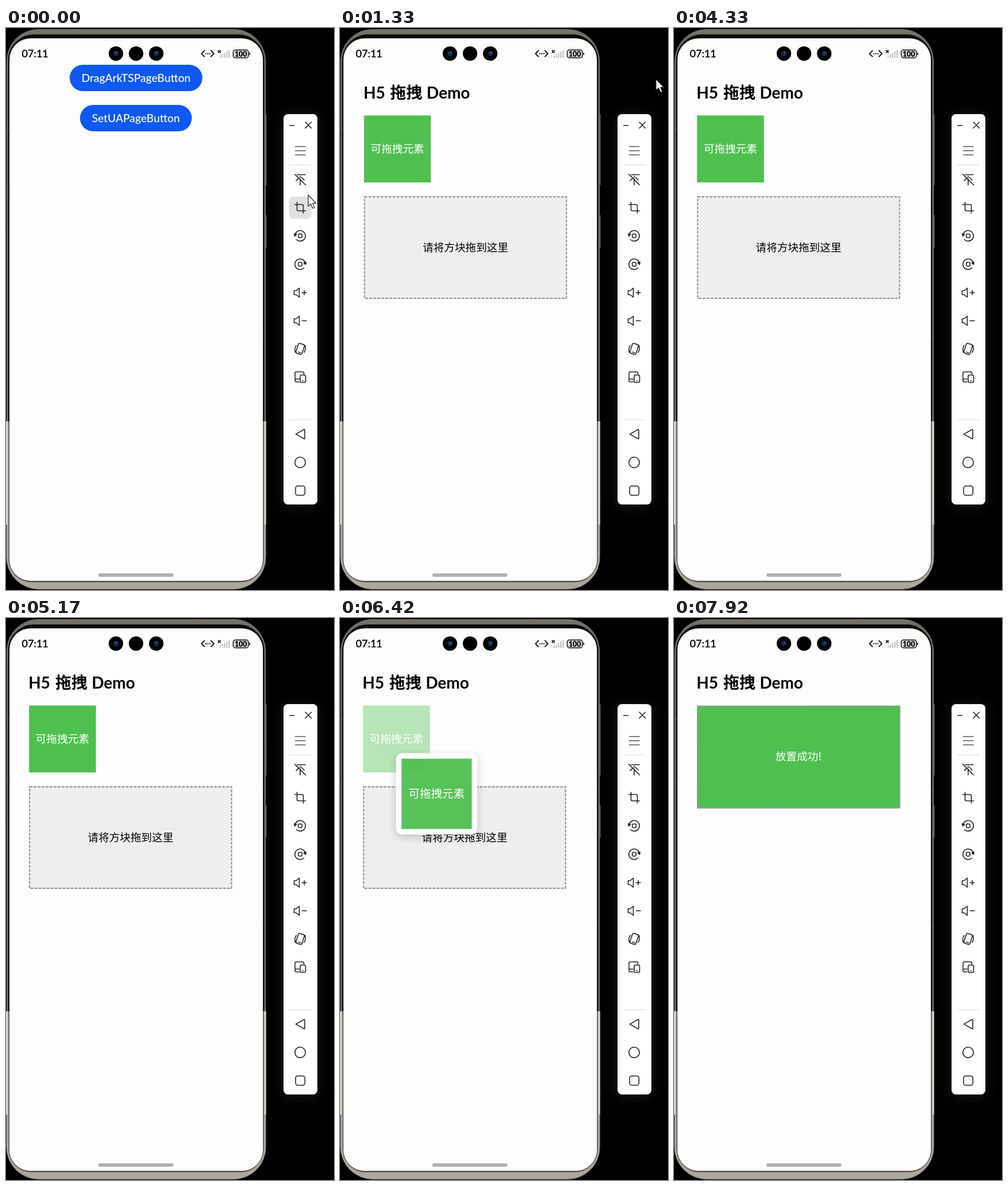
Animation of 572x979 px, one loop 8 s. Source, as an HTML page:

```html
<!DOCTYPE html>
<html lang="zh-CN">
<head>
<meta charset="utf-8">
<title>Drag demo</title>
<style>
  html, body { margin: 0; width: 100%; height: 100%; overflow: hidden; background: #000; }
  svg { display: block; width: 572px; height: 979px; }
  text { font-family: Lato, "Noto Sans CJK SC", "Noto Sans CJK", sans-serif; }
  .label { font-size: 19.3px; font-weight: 500; fill: #fff; text-anchor: middle; }
  .body { font-size: 18.67px; text-anchor: middle; font-family: "Noto Sans CJK SC", "Noto Sans CJK", sans-serif; }
  .title { font-size: 28px; font-weight: 700; }
  .icon { fill: none; stroke: #222; stroke-width: 1.6; stroke-linejoin: round; stroke-linecap: round; }
  #card { filter: drop-shadow(0 4px 7px rgba(0, 0, 0, .2)); }
  #bar { filter: drop-shadow(0 2px 12px rgba(255, 255, 255, .1)); }
</style>
</head>
<body>
<svg viewBox="0 0 572 979">
  <defs>
    <clipPath id="screen"><rect x="6" y="18" width="442" height="945" rx="37"/></clipPath>
    <clipPath id="lower"><rect y="685" width="456" height="294"/></clipPath>
    <linearGradient id="rim" x2="0" y2="1">
      <stop offset="0" stop-color="#77746d"/>
      <stop offset=".08" stop-color="#4d4b47"/>
      <stop offset="1" stop-color="#55534e"/>
    </linearGradient>
    <g id="tile">
      <rect x="-58.3" y="-58.3" width="116.6" height="116.6" fill="#4fc050"/>
      <text class="body" y="6.6" fill="#fff">可拖拽元素</text>
    </g>
  </defs>

  <!-- phone -->
  <rect x="1.5" y="2.5" width="451" height="974" rx="55" fill="url(#rim)" stroke="#77746d"/>
  <rect x="3" y="10.5" width="448" height="958" rx="46" fill="#0a0a0a" stroke="#716e68" stroke-width="1.4"/>
  <path d="M453.8 150V274M453.8 326V383" stroke="#55534e" stroke-width="1.6"/>
  <path d="M0 176H5M0 286H5M449 300H454M449 537H454M125 1V5M330 1V5" stroke="#66635c"/>
  <g clip-path="url(#lower)">
    <rect x="1" y="3" width="452" height="974.5" rx="56" fill="#aba79c" stroke="#8d897f"/>
    <path d="M1.5 685V865M452 685V865" stroke="#d5d1c5" stroke-width="3"/>
    <rect x="4.500" y="10" width="445" height="955.500" rx="40" fill="#55524c"/>
  </g>
  <rect x="6" y="18" width="442" height="945" rx="37" fill="#fdfdfd"/>

  <g clip-path="url(#screen)">
    <g id="menu">
      <rect x="111" y="64" width="231.5" height="46" rx="23" fill="#0f58f3"/>
      <text class="label" x="226.8" y="93.5">DragArkTSPageButton</text>
      <rect x="129" y="134" width="195" height="46" rx="23" fill="#0f58f3"/>
      <text class="label" x="226.5" y="163.5">SetUAPageButton</text>
    </g>
    <g id="page">
      <rect x="6" y="60" width="442" height="903" fill="#fdfdfd"/>
      <text class="title" x="39.3" y="122.5">H5</text>
      <text class="title" x="86" y="122.5">拖拽</text>
      <text class="title" x="149.5" y="122.5">Demo</text>
      <use id="source" href="#tile" x="98.5" y="210.7"/>
      <g id="zone">
        <rect id="zoneFill" x="40" y="293" width="354.5" height="179"/>
        <rect x="41.1" y="294.1" width="352.2" height="176.8" fill="none" stroke="#96949a" stroke-width="2.2" stroke-dasharray="4.67 2.33"/>
        <text id="zoneText" class="body" x="217.2" y="388.5"></text>
      </g>
    </g>
    <g id="card">
      <rect id="cardEdge" x="-67.6" y="-67.6" width="135.2" height="135.2" rx="11" fill="#fff"/>
      <use href="#tile"/>
    </g>
    <g id="badge">
      <circle r="14" fill="#0ee183"/>
      <path d="M-7 0H7M0 -7V7" stroke="#fff" stroke-width="1.6"/>
    </g>
  </g>

  <!-- status bar -->
  <text x="27.5" y="51" font-size="18" font-weight="500" stroke="#000" stroke-width=".3">07:11</text>
  <circle cx="191.7" cy="44.5" r="12.6"/><circle cx="226.8" cy="44.5" r="12.6"/><circle cx="262" cy="44.5" r="12.6"/>
  <g fill="#17295c"><circle cx="191.7" cy="44.5" r="4.5"/><circle cx="262" cy="44.5" r="4.5"/></g>
  <g fill="#5b7ac0"><circle cx="193" cy="43" r="1.1"/><circle cx="263.3" cy="43" r="1.1"/></g>
  <path d="M346.5 39L341 44.7L346.5 50.4M357 39L362.5 44.7L357 50.4" fill="none" stroke="#111" stroke-width="1.9"/>
  <path d="M347.5 44.7h2M351 44.7h2M354.5 44.7h2" stroke="#111" stroke-width="2"/>
  <path d="M369.6 38.6l4.8 4.8m0-4.8l-4.8 4.8" stroke="#111" stroke-width="1.7"/>
  <path d="M373.5 52v-4M377.4 52v-6M381.3 52v-8.5M385.2 52v-11M389.1 52v-13.5" stroke="#bbb" stroke-width="2"/>
  <rect x="396.2" y="38.2" width="26.6" height="13.8" rx="4" fill="#d8d8d8" stroke="#111" stroke-width="1.5"/>
  <path d="M425 43v4" stroke="#111" stroke-width="1.6"/>
  <text x="409.5" y="49.6" font-size="12.5" font-weight="900" text-anchor="middle">100</text>
  <rect x="161" y="950" width="131" height="6" rx="3" fill="#b0b0b0"/>

  <!-- toolbar -->
  <rect id="bar" x="484" y="150" width="59" height="680" rx="7.5" fill="#fff"/>
  <rect id="hover" x="493.5" y="293.5" width="39.5" height="39" rx="8" fill="#e1e1e1"/>
  <path d="M494 238.5H533M494 682.5H533" stroke="#dcdcdc"/>
  <g class="icon">
    <path d="M494.5 169.7H502.5M522 164L532.5 174.5M532.5 164L522 174.5"/>
    <path stroke="#555" d="M504.5 206.5H522M504.5 213.8H522M504.5 221H522"/>
    <g transform="translate(513 264)"><path d="M-9.5 -9.5L9.5 9.5M-5 -8.5H9M0 9.5V-1M-7 2L-2 -3M2 -4L7 1M0 -6V-4"/></g>
    <g transform="translate(513 313)"><path d="M-9.5 -5.5H3Q5.5 -5.5 5.5 -3V9.5M-5.5 -9.5V3Q-5.5 5.5 -3 5.5H9.5"/></g>
    <g id="turn" transform="translate(513 362)">
      <path d="M-8.7 -3A9.2 9.2 0 1 1 -6.5 6.5"/><rect x="-3.2" y="-3.2" width="6.4" height="6.4" rx="1.5"/>
      <path d="M-10.3 -3.5L-6.2 -2.5L-9.3 .5Z" fill="#222"/>
    </g>
    <use href="#turn" transform="translate(1026 49.5) scale(-1 1)"/>
    <g id="speaker" transform="translate(513 461)"><path d="M-10.5 -3.5H-7L-1.5 -8V8L-7 3.5H-10.5Z"/><path d="M3.5 0H11"/></g>
    <path d="M520.2 457.2V464.8"/>
    <use href="#speaker" y="49"/>
    <g transform="translate(513 559)">
      <rect x="-5.5" y="-9" width="11" height="18" rx="2.5" transform="rotate(18)"/>
      <path d="M-3 5.5L1 6.8M-7 -6Q-10.5 -1 -8.5 6M7 6Q10.5 1 8.5 -6"/>
    </g>
    <g transform="translate(513 608)">
      <path d="M-2 8.5H-6.5Q-9 8.5 -9 6V-6.5Q-9 -9 -6.5 -9H4Q6.5 -9 6.5 -6.5V-5M-9 3.5H-2"/>
      <rect x="0" y="-3.5" width="9.5" height="13" rx="2.5"/><path d="M4 6.5H5.5"/>
    </g>
    <path d="M505.5 707.5L519.5 699.5Q521 699 521 700.5V714.5Q521 716 519.5 715.5Z"/>
    <circle cx="513" cy="756.7" r="9.2"/>
    <rect x="505" y="797.7" width="16.3" height="16.3" rx="4"/>
  </g>

  <path id="cursor" d="M0 0V19.5L4.5 15.5L8 23L11 21.7L7.8 14.3H13.8Z" fill="#fff" stroke="#222" stroke-width="1.2" stroke-linejoin="round"/>
</svg>
<script>
const LOOP = 8000;
const el = id => document.getElementById(id);
const [menu, page, source, zone, zoneFill, zoneText, card, cardEdge, badge, hover, cursor] =
  ['menu', 'page', 'source', 'zone', 'zoneFill', 'zoneText', 'card', 'cardEdge', 'badge', 'hover', 'cursor'].map(el);

const clamp = v => Math.min(1, Math.max(0, v));
const smooth = v => v * v * (3 - 2 * v);
const show = (node, on) => node.setAttribute('visibility', on ? 'visible' : 'hidden');
const place = (node, x, y, scale = 1) =>
  node.setAttribute('transform', `translate(${x} ${y}) scale(${scale})`);

// time, x, y
const cursorPath = [[0, 527, 291], [80, 527, 291], [400, 550, 190], [750, 551, 89]];
const dragPath = [[5600, 98.5, 210.7], [5920, 124.5, 243], [6830, 204.5, 358], [7000, 208, 362]];

function along(path, t) {
  if (t <= path[0][0]) return path[0].slice(1);
  const i = path.findIndex(step => step[0] > t);
  if (i < 0) return path[path.length - 1].slice(1);
  const [t0, x0, y0] = path[i - 1], [t1, x1, y1] = path[i];
  const k = (t - t0) / (t1 - t0);
  return [x0 + (x1 - x0) * k, y0 + (y1 - y0) * k];
}

const PUSH = 1000, PUSHED = 1300, LIFT = 5400, DRAG = 5600, OVER = 6450, DROP = 7300;

// Critically damped page push: remaining share of the slide.
function slideLeft(t) {
  if (t < PUSH) return 1;
  const s = 18.5 * (t - 910) / 1000;
  return t > 2000 ? 0 : Math.exp(-s) * (1 + s);
}

function draw(t) {
  const [cx, cy] = along(cursorPath, t);
  place(cursor, cx, cy);
  show(cursor, t < 4250);
  show(hover, t < 160);

  const rest = slideLeft(t);
  show(menu, t < PUSHED);
  place(menu, -130 * (1 - rest), 0);
  show(page, t >= PUSH);
  place(page, 442 * rest, 0);

  const dropped = t >= DROP;
  show(source, t >= PUSH && !dropped);
  source.setAttribute('opacity', t < DRAG ? 1 : .4);
  place(zone, 0, dropped ? -140.3 : 0);
  zoneFill.setAttribute('fill', dropped ? '#4fc050' : '#eeeeef');
  zoneText.setAttribute('fill', dropped ? '#fff' : '#000');
  zoneText.textContent = dropped ? '放置成功!' : '请将方块拖到这里';

  const lift = smooth(clamp((t - LIFT) / (DRAG - LIFT)));
  const [x, y] = along(dragPath, t);
  show(card, t >= LIFT && !dropped);
  card.setAttribute('opacity', .94);
  cardEdge.setAttribute('opacity', lift);
  place(card, x, y, 1 + .05 * lift);
  show(badge, t >= OVER && !dropped);
  place(badge, x + 77.5, y - 72);
}

const start = performance.now();
function tick() {
  draw((performance.now() - start) % LOOP);
  requestAnimationFrame(tick);
}
tick();
</script>
</body>
</html>
```
